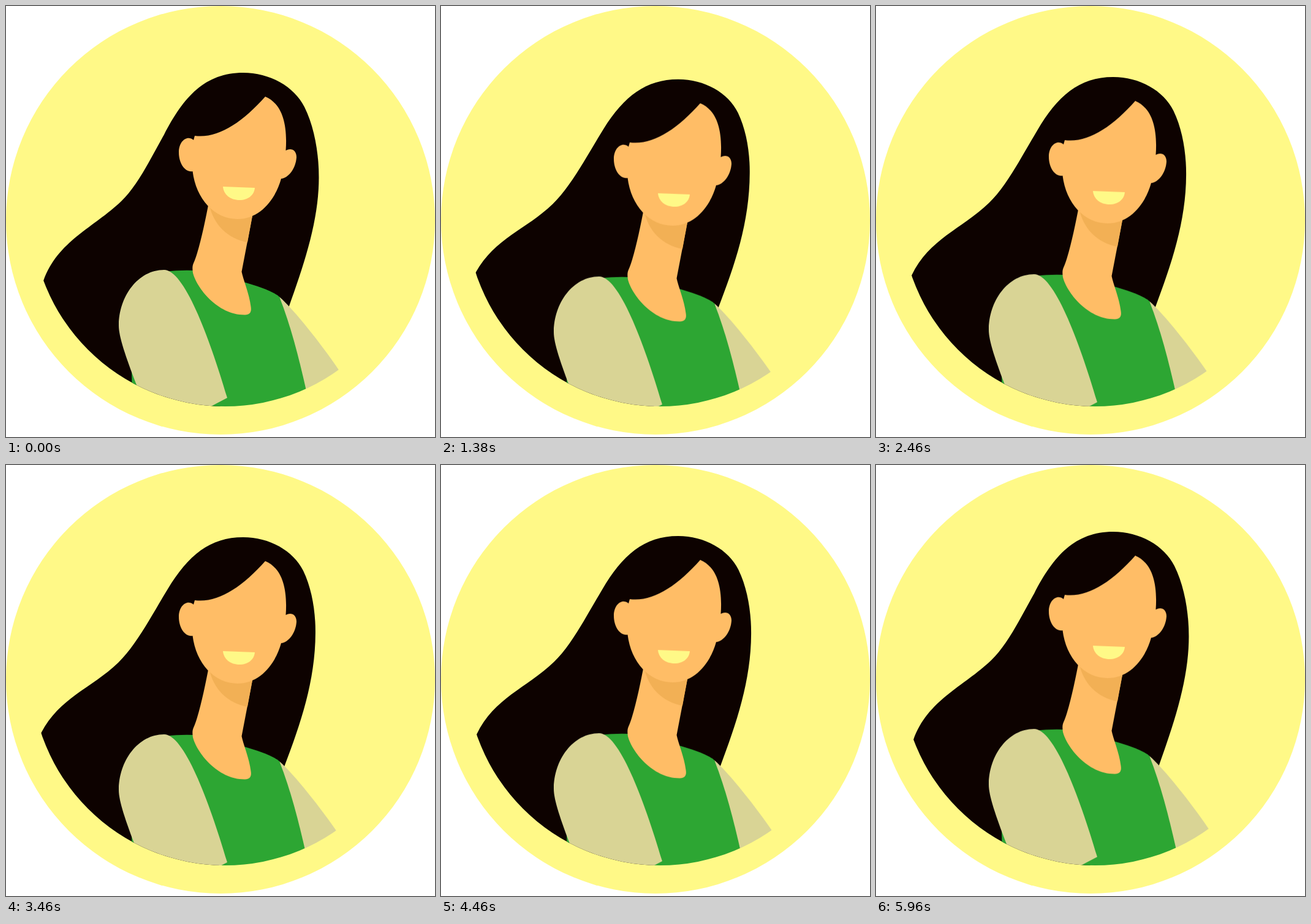
Write an HTML page that moves like this. It is 700 by 704 pixels and loops after 6 s.

```html
<!DOCTYPE html>
<html lang="en">
<head>
<meta charset="utf-8">
<title>Portrait</title>
<style>
  html, body { margin: 0; width: 100%; height: 100%; overflow: hidden; background: #fff; }
  svg { display: block; width: 100%; height: 100%; }

  .hair, .body { animation: 1s cubic-bezier(.333, 0, .667, 1) infinite alternate; }
  .hair { fill: #0d0200; animation-name: sway; }
  .body { animation-name: bob; }

  .glow { fill: #fff987; }
  .shirt { fill: #2da633; }
  .sleeve { fill: #d9d495; }
  .skin { fill: #ffbd66; }
  .shade { fill: #f2b055; }

  @keyframes bob {
    from { transform: translateY(0); }
    to { transform: translateY(16px); }
  }
  @keyframes sway {
    from {
      d: path("M387 109 C430 109 470 131 487 165 C503 197 510.5 240 510.5 280 C510.5 350 487 420 461 493 L450 524 L450 600 L300 680 L30 680 L50 480 L61 449 C84 384 143 362 188 319 C215 293 236 249 258 210 C290 148 325 109 387 109 Z");
    }
    to {
      d: path("M387 125 C430 125 468 147 483.5 179 C496 206 501 238 500.5 270 C500 355 476 424 448 494 L440 515 L440 600 L300 680 L30 680 L43 446 L54.5 428.5 C90.5 376 134.5 368.5 179.5 325.5 C212 294 243.5 235 269 196 C303 147 339 125 387 125 Z");
    }
  }
</style>
</head>
<body>
<svg viewBox="0 0 700 704">
  <clipPath id="frame"><circle cx="357.5" cy="337.5" r="316.5"/></clipPath>
  <circle class="glow" cx="350" cy="350" r="350"/>

  <g clip-path="url(#frame)">
    <path class="hair" d="M387 109 C430 109 470 131 487 165 C503 197 510.5 240 510.5 280 C510.5 350 487 420 461 493 L450 524 L450 600 L300 680 L30 680 L50 480 L61 449 C84 384 143 362 188 319 C215 293 236 249 258 210 C290 148 325 109 387 109 Z"/>
  </g>

  <g clip-path="url(#frame)">
    <g class="body">
      <path class="sleeve" d="M446 475 C470 496 515 553 542 593 L565 628 L490 628 Z"/>
      <path class="shirt" d="M258 434 Q285 431 306 432 L388 451 C410 457 438 467 446 475 C464 520 478 575 489 624 L497 670 L206 670 L205 590 Z"/>
      <path class="sleeve" d="M258 431 C215 431 184 475 184 522 C184 540 195 572 213 619 L232 672 L300 672 L361 640 C330 535 290 431 258 431 Z"/>

      <!-- neck -->
      <path class="skin" d="M331 320 C325 352 315 400 306 420 C304 425 304 428 305 436 C311 460 345 505 390 504.5 C398 504.5 401 500 399.5 491 C397 470 387 447 384.5 434 L402.5 340 Z"/>
      <path class="shade" d="M331 322 C338 358 362 380 394 386 L402.5 340 Z"/>

      <!-- head with ears -->
      <path class="skin" d="M423 148 C447 158 460 186 456.5 236 C465 231 474 235 474 247 C473 265 461 281 449 282 C440 315 415 348 378 348 C340 348 310 315 304.5 270 C292 272 282 257 282 239 C282 220 296 210 306 219 L308 212 C345 217 385 191 423 148 Z"/>
      <path class="glow" d="M354 295 L406 297 C405 309 395 317 381 317 C366 317 355 308 354 295 Z"/>
    </g>
  </g>
</svg>
</body>
</html>
```
